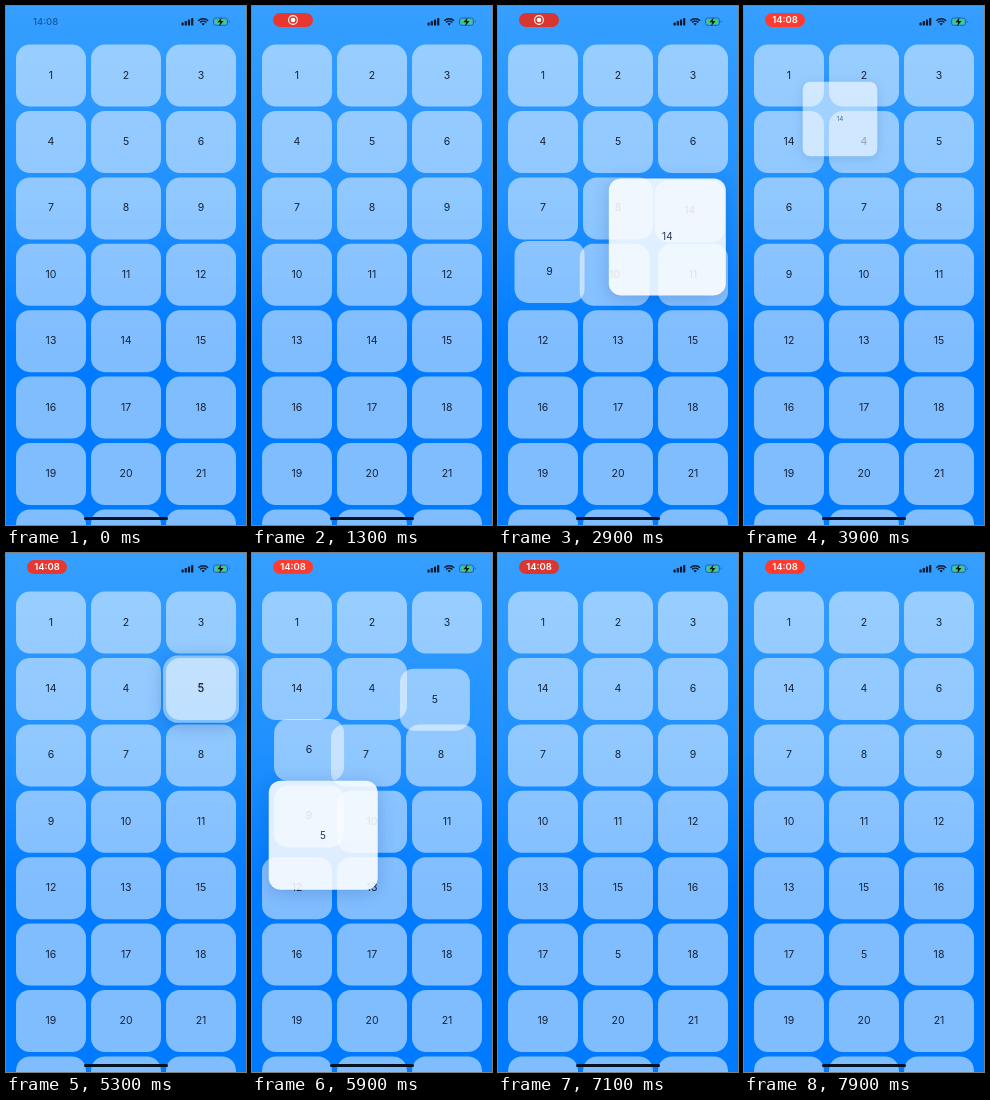
An HTML page for the animation above (8 s loop, 240x519 px).

```html
<!DOCTYPE html>
<html lang="en">
<head>
<meta charset="utf-8">
<title>Reorderable grid</title>
<style>
  html, body { margin: 0; width: 100%; height: 100%; overflow: hidden; }
  #stage {
    position: relative; width: 240px; height: 519px; overflow: hidden;
    background: linear-gradient(#369fff, #1f90ff 38%, #007aff 66%);
    font: 10.5px Inter, Roboto, sans-serif; color: #172338;
  }
  .box {
    position: absolute; left: 0; top: 0; width: 70px; height: 61.6px;
    display: flex; align-items: center; justify-content: center;
    border-radius: 14px; background: rgba(255, 255, 255, .5);
  }
  .lifted { background: rgba(255, 255, 255, .42); box-shadow: 0 3px 16px rgba(0, 50, 130, .26); }
  .preview { background: #fff; border-radius: 12px; box-shadow: 0 3px 18px rgba(0, 50, 130, .25); }
  #clock, #pill { position: absolute; font-weight: 600; font-size: 9.5px; }
  #clock { left: 27px; top: 10px; line-height: 12px; color: #0d3f7a; font-weight: 500; opacity: .75; }
  #pill { left: 21px; top: 7px; width: 40px; height: 14px; border-radius: 7px; color: #fff; }
  #pill > * { position: absolute; inset: 0; line-height: 14px; text-align: center; }
  #status { position: absolute; left: 0; top: 0; }
  #home { position: absolute; left: 78px; top: 511px; width: 84px; height: 3px; border-radius: 2px; background: #06121f; }
</style>
</head>
<body>
<div id="stage">
  <div id="grid"></div>
  <div id="clock">14:08</div>
  <div id="pill">
    <svg id="rec" width="40" height="14">
      <circle cx="20" cy="7" r="4.4" fill="none" stroke="#fff" stroke-width="1.1"/>
      <circle cx="20" cy="7" r="2.3" fill="#fff"/>
    </svg>
    <span id="time">14:08</span>
  </div>
  <svg id="status" width="240" height="28">
    <g fill="#071a30">
      <rect x="175.5" y="16.5" width="2.2" height="3" rx=".6"/>
      <rect x="178.7" y="15" width="2.2" height="4.5" rx=".6"/>
      <rect x="181.9" y="13.5" width="2.2" height="6" rx=".6"/>
      <rect x="185.1" y="12" width="2.2" height="7.5" rx=".6"/>
      <path d="M195.5 17.8a2.5 2.5 0 0 1 3.4 0l-1.7 1.8z"/>
    </g>
    <g fill="none" stroke="#071a30" stroke-width="1.4">
      <path d="M192.3 14.7a7 7 0 0 1 9.8 0M194 16.6a4.6 4.6 0 0 1 6.4 0"/>
    </g>
    <rect x="207.5" y="12" width="14" height="7.4" rx="2.2" fill="none" stroke="#2a6290" stroke-width=".9"/>
    <rect x="208.8" y="13.2" width="11.4" height="5" rx="1.2" fill="#3fd06a"/>
    <path d="M222.8 14.3v2.8a1.5 1.5 0 0 0 0-2.8" fill="#2a6290"/>
    <path d="M215.6 11.4l-4.2 4.9h2.7l-.9 3.9 4.3-5.1h-2.8z" fill="#06121f"/>
  </svg>
  <div id="home"></div>
</div>
<script>
const LOOP = 8000, COUNT = 24, MOVE = 350;
const $ = id => document.getElementById(id);
const clamp = x => Math.min(1, Math.max(0, x));
const ramp = (t, start, len) => clamp((t - start) / len);
const smooth = x => x * x * (3 - 2 * x);
const mix = (a, b, p) => a + (b - a) * p;
const slot = i => [45 + 75 * (i % 3), 69.4 + 66.4 * Math.floor(i / 3)];

// [time, item, new index]
const moves = [
  [2330, 14, 10], [2595, 14, 8], [3230, 14, 3],
  [5840, 5, 9], [6023, 5, 10], [6060, 5, 13], [6230, 5, 16]
];

// Sideways sway of a dragged item's own slot: item, time, dx, dy
const sways = [[14, 2400, -5, 0], [5, 6300, 0, 16]];

// path: [time, x, y]
const drags = [
  { item: 14, lift: 1650, swap: 2310, drop: 3750, size: 117, path: [
    [2150, 120, 335], [2340, 138, 302], [2400, 145, 286], [2590, 188, 220],
    [2900, 169.5, 231], [3230, 76, 145], [3500, 66, 122], [3850, 96, 113]] },
  { item: 5, lift: 4800, swap: 5560, drop: 6700, size: 108.5, path: [
    [5400, 195, 136], [5650, 160, 195], [5840, 70, 262], [6060, 104, 335],
    [6230, 104, 410], [6300, 92.5, 435.5], [6480, 105, 428], [6750, 118, 408]] }
];

function makeBox(label, cls = '') {
  const el = document.createElement('div');
  el.className = 'box ' + cls;
  el.innerHTML = `<span>${label}</span>`;
  $('grid').append(el);
  return el;
}

// Every reorder adds its own eased shift to the items it displaces.
let order = Array.from({ length: COUNT }, (_, i) => i + 1);
const tiles = order.map((n, i) => ({ n, home: slot(i), shifts: [], el: makeBox(n) }));
for (const [time, item, to] of moves) {
  const next = order.filter(n => n !== item);
  next.splice(to, 0, item);
  for (const tile of tiles) {
    const a = slot(order.indexOf(tile.n)), b = slot(next.indexOf(tile.n));
    if (a[0] !== b[0] || a[1] !== b[1]) tile.shifts.push([time, b[0] - a[0], b[1] - a[1]]);
  }
  order = next;
}
for (const d of drags) {
  d.lifted = makeBox(d.item, 'lifted');
  d.preview = makeBox(d.item, 'preview');
}

// Smooth curve through timed points
function along(path, t) {
  const last = path.length - 1;
  if (t <= path[0][0]) return path[0].slice(1);
  if (t >= path[last][0]) return path[last].slice(1);
  const i = path.findIndex(p => p[0] > t) - 1;
  const a = path[i], b = path[i + 1], len = b[0] - a[0], u = (t - a[0]) / len;
  const slope = (k, c) => k === 0 || k === last ? 0 :
    (path[k + 1][c] - path[k - 1][c]) / (path[k + 1][0] - path[k - 1][0]);
  return [1, 2].map(c => mix(a[c], b[c], smooth(u)) +
    len * u * (1 - u) * ((1 - u) * slope(i, c) - u * slope(i + 1, c)));
}

function place(el, x, y, w = 70, h = 61.6, scale = 1) {
  el.style.transform = `translate(${x - w / 2}px, ${y - h / 2}px) scale(${scale})`;
}

function drawTile(tile, t) {
  let [x, y] = tile.home;
  for (const [start, dx, dy] of tile.shifts) {
    const p = smooth(ramp(t, start, MOVE));
    x += dx * p;
    y += dy * p;
  }
  for (const [item, at, dx, dy] of sways) {
    if (item !== tile.n) continue;
    const p = Math.exp(-(((t - at) / 90) ** 2));
    x += dx * p;
    y += dy * p;
  }
  place(tile.el, x, y);
}

function drawDrag(d, t) {
  const up = smooth(ramp(t, d.lift, 350)), grow = ramp(t, d.swap, 300);
  const [lx, ly] = along(d.path, t - 60);
  d.lifted.style.opacity = up * (1 - ramp(t, d.swap + 50, 150));
  place(d.lifted, lx, ly, 70, 61.6, 1 + .085 * up + .25 * grow);

  const gone = ramp(t, d.drop, 300), shrink = 1 - .72 * gone;
  const [x, y] = along(d.path, t);
  const w = mix(70, d.size, grow), h = mix(61.6, d.size, grow);
  const s = d.preview.style;
  s.width = w + 'px';
  s.height = h + 'px';
  s.opacity = .87 * grow * (1 - gone ** 1.5);
  d.preview.firstChild.style.transform = `scale(${mix(.5, .95, grow)})`;
  place(d.preview, x, y, w, h, shrink);
}

function drawStatus(t) {
  const shown = ramp(t, 100, 300), swap = ramp(t, 3250, 250);
  const glow = .5 + .5 * Math.cos((t - 3900) / 2000 * 2 * Math.PI);
  $('clock').style.opacity = .75 * (1 - shown);
  $('pill').style.opacity = shown;
  $('pill').style.background = `rgb(${mix(216, 255, glow)}, ${mix(54, 59, glow)}, 48)`;
  $('rec').style.opacity = 1 - swap;
  $('time').style.opacity = swap;
}

function frame() {
  const t = performance.now() % LOOP;
  tiles.forEach(tile => drawTile(tile, t));
  drags.forEach(d => drawDrag(d, t));
  drawStatus(t);
  requestAnimationFrame(frame);
}
frame();
</script>
</body>
</html>
```
